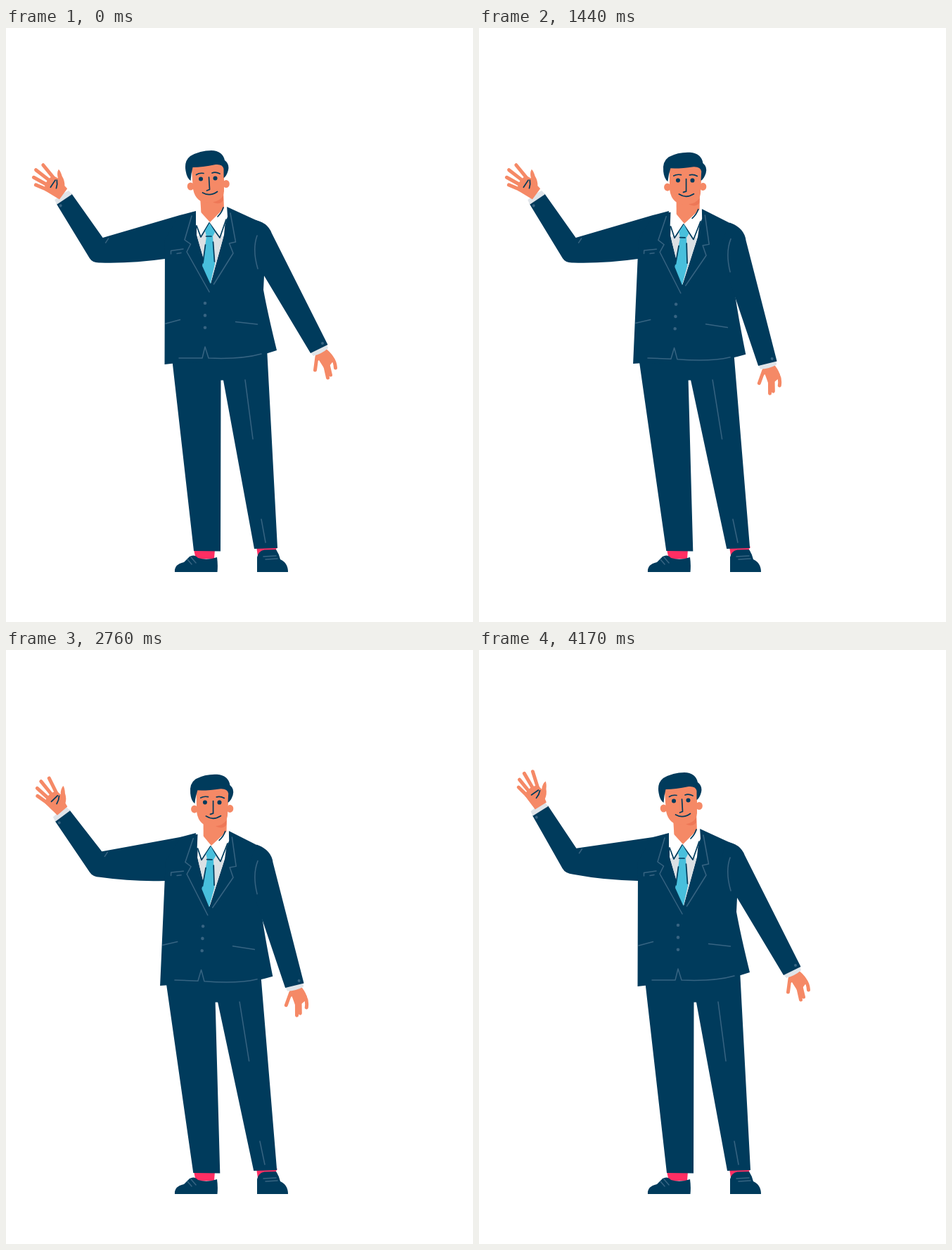
An HTML page for the animation above (4200 ms loop, 664x844 px).

```html
<!DOCTYPE html>
<html lang="en">
<head>
<meta charset="utf-8">
<title>Waving man</title>
<style>
  html, body { margin: 0; width: 100%; height: 100%; overflow: hidden; background: #fff; }
  svg { display: block; width: 100%; height: 100%; }
  .suit { fill: #003b5c; }
  .skin { fill: #f58966; }
  .cuff { fill: #dfe4e9; }
  .line, .ink, .finger { fill: none; stroke-linecap: round; stroke-linejoin: round; }
  .line { stroke: #376482; stroke-width: 1.5; }
  .ink { stroke: #003b5c; stroke-width: 1.7; }
  .finger { stroke: #f58966; stroke-width: 5; }
  .dot { fill: #376482; }
  .buttons { stroke-width: 4.6; stroke-dasharray: 0 17.4; }
</style>
</head>
<body>
<svg viewBox="0 0 664 844">
  <path fill="#ff2e63" d="M267 741H297L296 754L270 755Z M356 737H386L380 747L358 750Z"/>
  <g id="legs">
    <path class="suit" d="M235 460L237 478L267 743L305 743.5L305.5 500.5H309L353 740L386 739L371 455Z"/>
    <path class="line" d="M340 500L351 584M363 698L369 731"/>
  </g>

  <path class="suit" d="M240 773Q239 762 253 759L261 751Q268 747 273 753Q286 757 300 752Q301.5 763 300.5 773Z"/>
  <path class="suit" d="M357 773V752Q359 743 367 741.5L384 741Q388 747 390 755Q401 760 401 773Z"/>
  <path class="line" d="M258 755L264 762M263 752L270 760M366 751L384 750M369 755L386 754"/>

  <path id="sleeve" class="suit"/>
  <path id="crease" class="line"/>
  <g id="cuff">
    <path class="cuff" d="M-12 -4Q0 -6 12 -4L13 3H-13Z"/>
    <circle class="dot" cx="-9.5" cy="7.5" r="2"/>
  </g>
  <g id="hand">
    <path class="finger" d="M158 184L157.5 166M164 182L166 159M171 182L177 157.5M177 185L187.5 164"/>
    <path class="skin" d="M152.5 205L155.5 181Q166 174 179.5 183L179 191Q185 186 191 186.5Q190 190 184 195Q180 201 173 204L171 209Z"/>
    <path class="ink" d="M163 186.500L175 188.500M165 194.500Q171 194 176 190.500"/>
  </g>

  <g id="body">
    <path class="suit" d="M268 261L245 268L226 300L225.5 478L243 476Q330 477 385 458Q372 405 366 372L367 352L374 300Q372 281 362 276L314 254Z"/>
    <g id="arm">
      <path class="skin" d="M440 461L456 456.5Q465 464 467 471L460 480L452 483L445 472L440 475Z"/>
      <path class="finger" stroke-width="4" d="M442 467L439.5 486M453 477L457.5 497M457 474L461.5 493M463 468Q468 474 468.5 483"/>
      <path class="cuff" d="M433 461L437 466Q449 463 458 455L456 449Z"/>
      <path class="suit" d="M350 272Q372 275 378 292L457.5 450L433 462L367 352L345 300Z"/>
      <circle class="dot" cx="450" cy="448" r="2"/>
    </g>

    <path fill="#fff" d="M271 255L314 252L310 294L291 363L271 294Z"/>
    <path fill="#dbe0e4" d="M272 297L290 277L309 297L291 363Z"/>

    <g id="head">
      <path class="skin" d="M276 238L277.5 264L290.5 277L310 257L309 230Z"/>
      <ellipse class="skin" cx="262.5" cy="225" rx="4.8" ry="5.5"/>
      <ellipse class="skin" cx="313" cy="221.5" rx="4.8" ry="5.5"/>
      <path class="skin" d="M263 190H310V232Q308 249 292 249Q270 250 266 229Z"/>
      <path fill="#ee7857" d="M294 247.5Q304 246 309 238V245Q304 252 294 247.5Z"/>
      <path class="suit" d="M262.5 217Q257 213 255.5 203Q253 189 262 182Q276 174 292 174Q308 174.5 311 188Q318 193 316 202Q313.5 211 309.5 213V200Q308 193 298 194Q279 198 265.5 198Q263 207 262.5 217Z"/>
      <circle class="suit" cx="277" cy="214.5" r="3"/>
      <circle class="suit" cx="297.5" cy="213.5" r="3"/>
      <path class="ink" d="M270.5 208.5Q275 205.5 281 206.5M293 206Q298 204 304 207M288.5 212L289.5 229.5L285.5 231M279.5 234Q290 240 300.5 232.5"/>
    </g>

    <path fill="#fff" d="M270 254L290 276L277 297L270 280Z M314 252L315 268L305 298L290 276Z"/>
    <path class="ink" d="M271 281L277 297L289 277L304 298L313 272M301 268Q307 262 309 255"/>
    <path fill="#48bfdc" d="M289.5 277L283 288L285 296L279 338L290.5 363.5L297 335L294 296L297 290Z"/>
    <path class="ink" d="M284.5 296H292M283.5 308L280 334M294.5 304L296.5 332"/>

    <path class="line" d="M264 267L254 301L262.5 307L257 318L289 375M319 263L326.5 304L317.5 306L323 320L295.5 364"/>
    <path class="line" d="M234.5 321V316.5L252 314M243 320.5L249 319.5M357 295Q350 315 358 342M227 420L247.5 414.5M326.5 417.5L357.5 421"/>
    <path class="line" d="M246 469H279L283 453L288 469Q335 471 363 463"/>
    <path class="line buttons" d="M283 391V427"/>
  </g>
</svg>
<script>
const LOOP = 4200, WAVE = 720, LEAN = 3.2;
const { sin, cos, exp, min, max, hypot, PI } = Math;
const set = (id, name, value) => document.getElementById(id).setAttribute(name, value);
const rad = deg => deg * PI / 180;
const clamp = u => max(0, min(1, u));
const ease = u => (u = clamp(u), u * u * (3 - 2 * u));

// Rises after the delay, holds, and returns to rest before the loop ends.
const hold = (t, delay) => ease((t - delay) / (900 - delay / 2)) * (1 - ease((t - 3500) / 650));
// Damped swing that peaks as the lean completes.
const sway = t => exp((930 - t) / 900) * cos((t - 930) / 2200 * 2 * PI);

// Point at a given distance from a towards b.
function toward(a, b, distance) {
  const k = distance / hypot(b[0] - a[0], b[1] - a[1]);
  return [a[0] + (b[0] - a[0]) * k, a[1] + (b[1] - a[1]) * k];
}

function drawWave(t) {
  const x = t / WAVE * 2 * PI;
  const c = cos(x), s = sin(x), c2 = cos(2 * x);
  const elbowY = 297 + 13.7 * c + 3.4 * c2;
  const fore = -7 - 30.3 * c + 14.6 * s + 3.4 * c2;
  const palm = -13.5 - 36.5 * c + 12.7 * s - 4 * c2;

  const inner = [153.5 + .47 * fore, elbowY - 16];
  const corner = [118 - .15 * fore, elbowY + 20];
  const armpit = [226, 328];
  const [dx, dy] = [sin(rad(fore)), -cos(rad(fore))];
  const length = 83 + 5 * c;
  const wrist = [(inner[0] + corner[0]) / 2 + length * dx, elbowY + length * dy];
  const edge = side => [wrist[0] - 2 * dx - side * 13 * dy, wrist[1] - 2 * dy + side * 13 * dx];
  const round = 15 + .2 * fore;
  const under = toward(corner, armpit, round * 1.3);
  const bulge = [(under[0] + armpit[0]) / 2, (under[1] + armpit[1]) / 2 + 4];

  set('sleeve', 'd', `M270 260L247 266L${inner}L${edge(1)}L${edge(-1)}L${toward(corner, edge(-1), round)}`
    + `Q${corner} ${under}Q${bulge} ${armpit}L262 330Z`);
  set('crease', 'd', `M${inner[0] + 4} ${inner[1] + 7}l4 -6`);
  set('crease', 'opacity', clamp((-fore - 15) / 10));
  set('cuff', 'transform', `translate(${wrist}) rotate(${fore})`);
  set('hand', 'transform', `translate(${wrist}) rotate(${palm - 12}) translate(-157 -209)`);
}

function draw(t) {
  const head = hold(t, 0);
  const body = head * (.72 + .27 * sway(t));
  const arm = hold(t, 150) * (11.8 + 8 * sway(t));
  set('legs', 'transform', `translate(${-body} 742) skewX(${2.3 * body}) translate(0 -742)`);
  set('body', 'transform', `rotate(${LEAN * body} 245 322)`);
  set('head', 'transform', `rotate(${LEAN * (head - body)} 245 322)`);
  set('arm', 'transform', `rotate(${arm - LEAN * body} 352 298)`);
  drawWave(t);
}

const start = performance.now();
function tick() {
  draw((performance.now() - start) % LOOP);
  requestAnimationFrame(tick);
}
draw(0);
requestAnimationFrame(tick);
</script>
</body>
</html>
```
